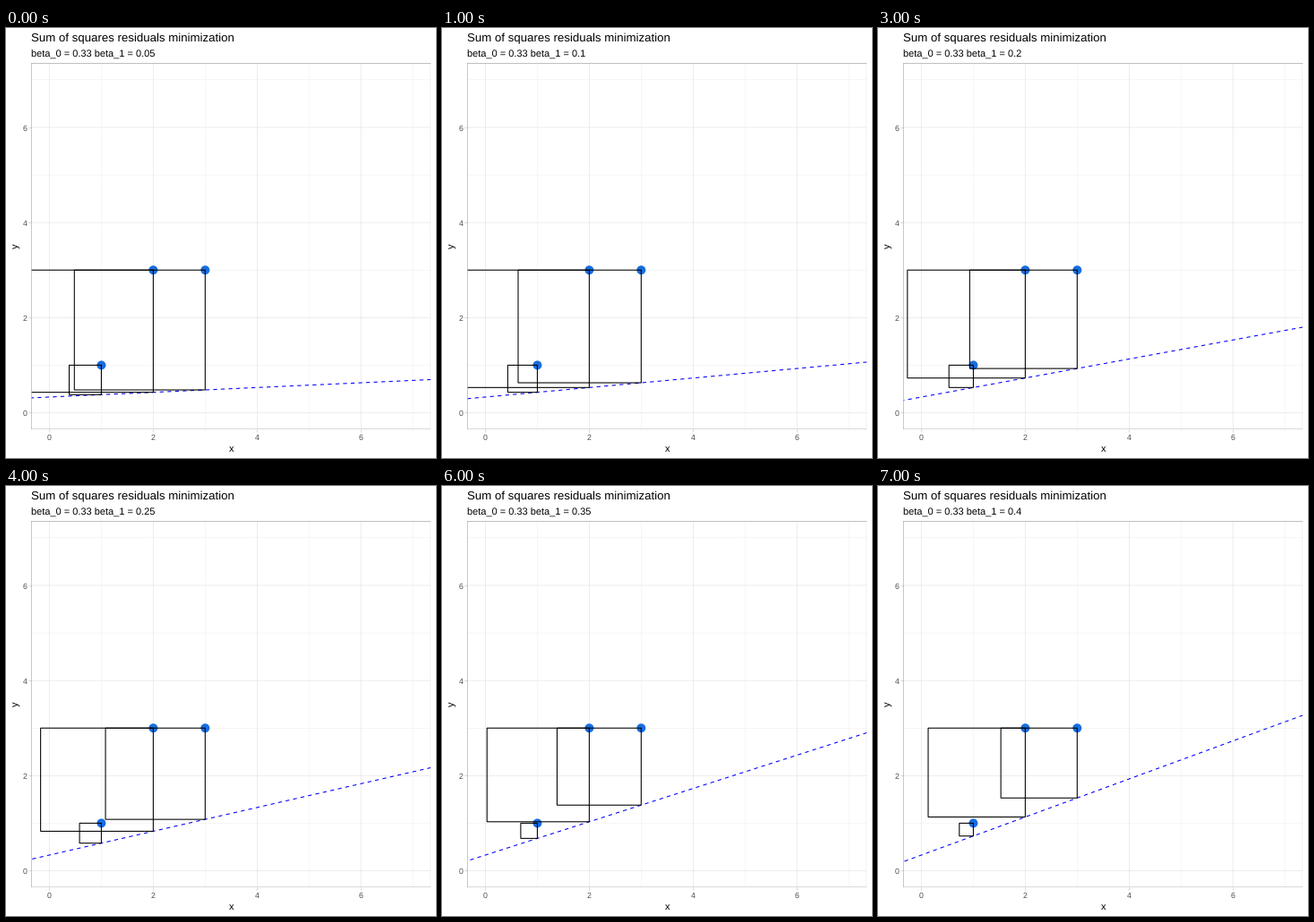
These frames come from a looping animation (480x480 px, 8 s). A matplotlib script:

```python
import matplotlib.pyplot as plt
from matplotlib.animation import FuncAnimation
from matplotlib.patches import Ellipse, Rectangle

plt.rcParams["font.family"] = "Liberation Sans"
plt.rcParams["text.hinting"] = "none"

SIZE = 480
LEFT, RIGHT, TOP, BOTTOM = 28.2, 474.4, 39.3, 448.05   # panel edges, px from top left
LOW, HIGH = -0.35, 7.35
POINTS = [(1, 1), (2, 3), (3, 3)]
DOT = 10
BETA_0 = 0.33
STEP = 0.05
LINE = 1.067
GREY = "#b3b3b3"

# At 72 dpi one point equals one pixel.
fig = plt.figure(figsize=(SIZE / 72, SIZE / 72), dpi=72, facecolor="white")
ax = fig.add_axes([LEFT / SIZE, 1 - BOTTOM / SIZE,
                   (RIGHT - LEFT) / SIZE, (BOTTOM - TOP) / SIZE])
ax.set(xlim=(LOW, HIGH), ylim=(LOW, HIGH), xticks=[0, 2, 4, 6], yticks=[0, 2, 4, 6])
ax.tick_params(length=2.75, width=LINE / 2, color=GREY, labelbottom=False, labelleft=False)
ax.set_axisbelow(True)
ax.spines[:].set_visible(False)


def label(x, y, text, size, color="black", **kw):
    """Place text by its baseline, in pixels from the top left."""
    return fig.text(x / SIZE, 1 - y / SIZE, text, size=size, color=color,
                    va="baseline", **kw)


def to_px(v, start, end):
    return start + (v - LOW) / (HIGH - LOW) * (end - start)


def outline(color, zorder, **kw):
    return ax.add_patch(Rectangle((0, 0), 1, 1, fill=False, ec=color, lw=LINE,
                                  joinstyle="miter", snap=False, zorder=zorder, **kw))


for v in range(8):
    width = LINE / 4 if v % 2 else LINE / 2
    ax.axvline(v, color="#dedede", lw=width, snap=False, zorder=0.5)
    ax.axhline(v, color="#dedede", lw=width, snap=False, zorder=0.5)
    if v % 2 == 0:
        label(to_px(v, LEFT, RIGHT), 460, str(v), 8.8, "#4d4d4d", ha="center")
        label(23.2, to_px(v, BOTTOM, TOP) + 3.5, str(v), 8.8, "#4d4d4d", ha="right")

label(LEFT, 15, "Sum of squares residuals minimization", 13.2)
subtitle = label(LEFT, 33, "", 11)
label((LEFT + RIGHT) / 2, 473, "x", 11, ha="center")
label(14.5, 243, "y", 11, ha="center", rotation=90, rotation_mode="anchor")

unit_x = (RIGHT - LEFT) / (HIGH - LOW)
unit_y = (BOTTOM - TOP) / (HIGH - LOW)
for point in POINTS:
    ax.add_patch(Ellipse(point, DOT / unit_x, DOT / unit_y, fc="#186ddf", lw=0, zorder=2))

fit, = ax.plot([], [], color="#0000ff", lw=LINE, linestyle=(0, (4, 4)),
               dash_capstyle="butt", zorder=2.1)
squares = [outline("black", 2.2) for _ in POINTS]
outline(GREY, 3, transform=ax.transAxes)


def draw(i):
    beta_1 = round(STEP * (i + 1), 2)
    subtitle.set_text(f"beta_0 = {BETA_0} beta_1 = {beta_1:g}")
    # The dash pattern starts at the right edge.
    fit.set_data([HIGH, LOW], [BETA_0 + beta_1 * HIGH, BETA_0 + beta_1 * LOW])
    for square, (x, y) in zip(squares, POINTS):
        guess = BETA_0 + beta_1 * x
        side = y - guess
        square.set_bounds(x - side, guess, side, side)
    return [subtitle, fit, *squares]


anim = FuncAnimation(fig, draw, frames=8, interval=1000, repeat=True, blit=False)
plt.show()
```
